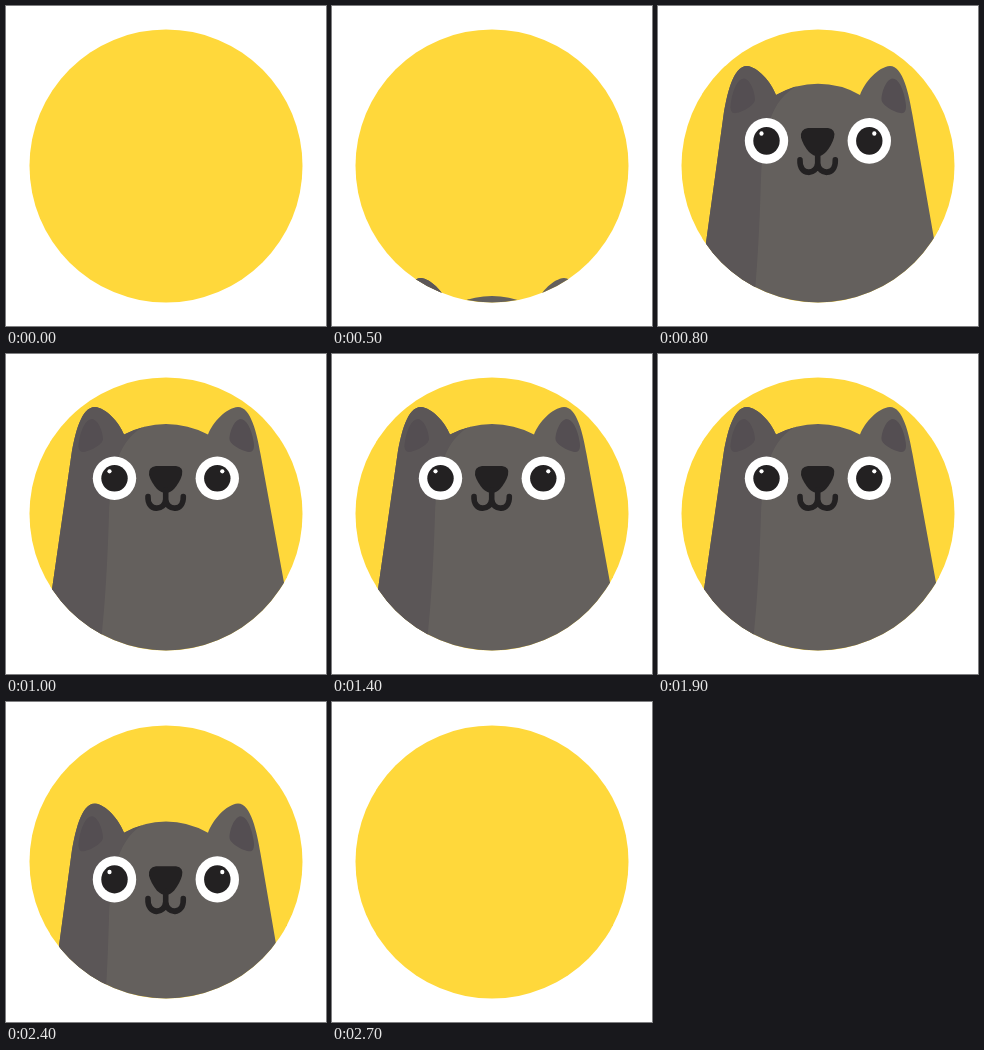
Recreate the animation shown at these times as an HTML page. Size 320 px wide and 320 px high, loop 3100 ms.

```html
<!DOCTYPE html>
<html lang="en">
<head>
<meta charset="utf-8">
<title>Peeking cat</title>
<style>
  html, body { margin: 0; height: 100%; overflow: hidden; background: #fff; }
  svg { display: block; width: 100vw; height: 100vh; }
</style>
</head>
<body>
<svg viewBox="0 0 320 320">
  <defs>
    <!-- open above the middle, so the ears may leave the disc -->
    <clipPath id="hole">
      <path d="M0 0H320V160H296.5A136.5 136.5 0 0 1 23.5 160H0Z"/>
    </clipPath>
    <clipPath id="outline"><use href="#body"/></clipPath>
    <g id="eye">
      <circle r="21.7" fill="#fff"/>
      <circle r="13.2" fill="#232122"/>
      <circle cx="-5" cy="-7" r="2.1" fill="#fff"/>
    </g>
  </defs>
  <circle cx="160" cy="160" r="136.5" fill="#ffd83b"/>
  <g clip-path="url(#hole)">
    <g id="cat">
      <path id="body" fill="#64605d" d="M65.5 100C69 80 75 53 89 53C100 54 113 68 118 80.5Q138 70 160 70T202 80.5C207 68 220 54 232 53C245 53 251 80 254.5 100L281 245V390H44V249Z"/>
      <path fill="#5b5657" clip-path="url(#outline)" d="M40 40H118V80L141 71C112 84 105 118 103 160Q101 228 96 278L92 390H40Z"/>
      <path id="inner" fill="#544e52" d="M86 65C93 66 97 79 97 85C97 91 82 98 77 98C72 98 72 92 73 87C75 75 80 65 86 65Z"/>
      <use href="#inner" transform="matrix(-1 0 0 1 320.5 0)"/>
      <use id="left" href="#eye"/>
      <use id="right" href="#eye"/>
      <path fill="#232122" d="M150 112H170Q178 113 176 121Q174 128 168 135Q160 143 151 135Q145 128 143 121Q142 113 150 112Z"/>
      <path fill="none" stroke="#232122" stroke-width="5.6" stroke-linecap="round" d="M159.7 136V146M142 142.5C141 158 159 157 159.7 145.5C160.5 157 178 158 177.3 142.5"/>
    </g>
  </g>
</svg>
<script>
const LOOP = 3100, STEP = 100, EAR_TIP = 53;
const $ = id => document.getElementById(id);
const between = (t, from, to) => t >= from && t < to;

// Drop below the resting place, by steps away from rest: first a leap, then the dive.
const drop = n => n < 1 ? -47 * Math.sin(n * Math.PI / 2) : -47 + 54 * (n - 1) ** 1.15;

// Three small hops
const hop = t => between(t, 1000, 1600) ? -9 * Math.sin(Math.PI * (t - 1000) / 200) ** 2 : 0;

// Lids close slowly and snap open
const openness = t => between(t, 1600, 1900) ? 1 - .95 * (t - 1600) / 200 : 1;

function draw(now) {
  const t = Math.floor(now % LOOP / STEP) * STEP;
  // the way out retraces the way in
  const away = Math.max(0, 1000 - t, t - 2136) / STEP;
  const y = drop(away) + hop(t);
  const stretch = 1 + Math.min(.07, .025 * away);
  const open = openness(t);
  $("cat").setAttribute("transform",
    `translate(0 ${y + EAR_TIP}) scale(1 ${stretch}) translate(0 ${-EAR_TIP})`);
  $("left").setAttribute("transform", `translate(108.5 124.3) scale(1 ${open})`);
  $("right").setAttribute("transform", `translate(211.3 124.3) scale(-1 ${open})`);
}

const start = performance.now();
function tick() {
  draw(performance.now() - start);
  requestAnimationFrame(tick);
}
tick();
</script>
</body>
</html>
```
